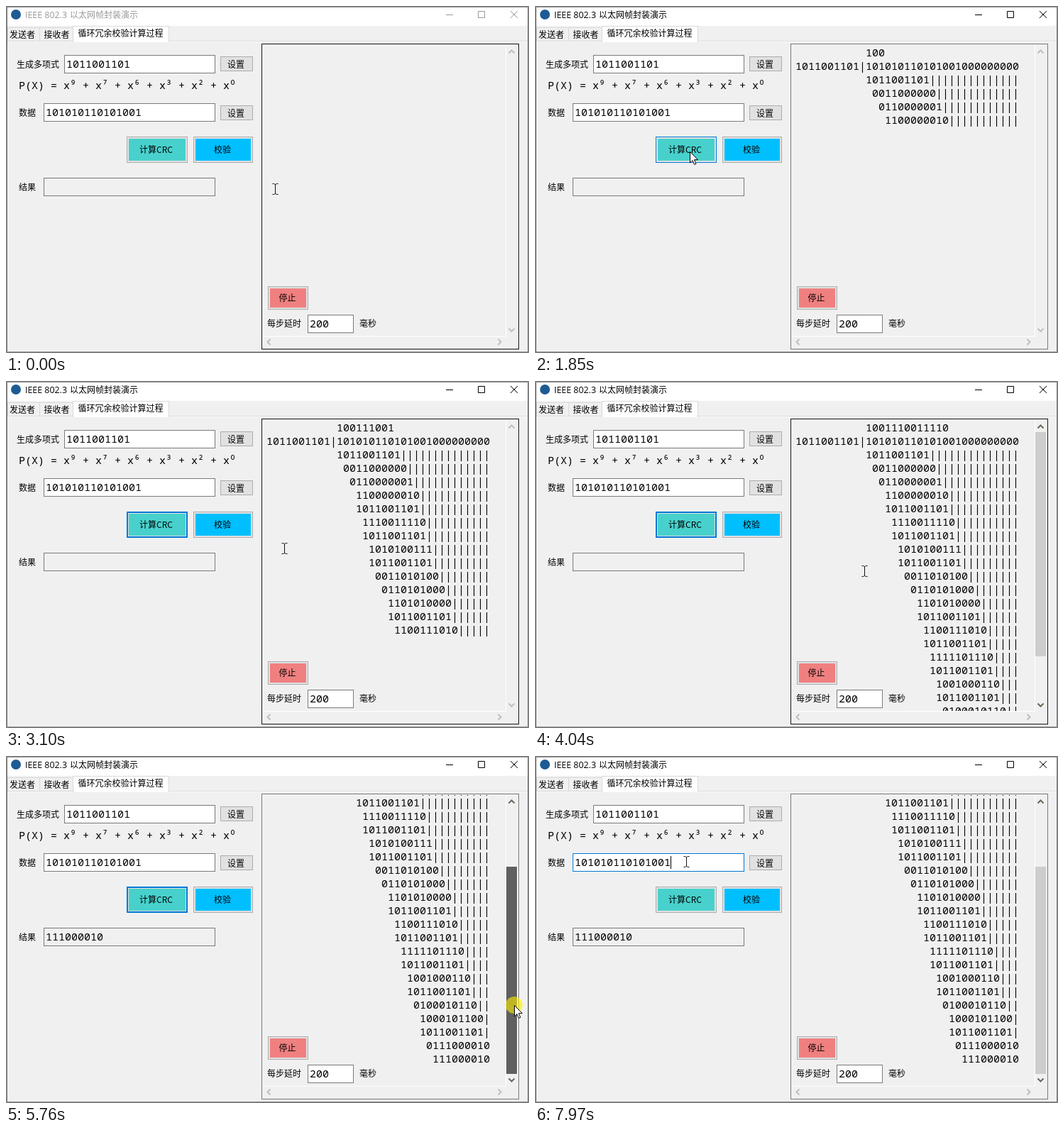
Recreate the animation shown at these times as an HTML page. Size 737 by 489 pixels, loop 8000 ms.

```html
<!DOCTYPE html>
<html lang="zh">
<head>
<meta charset="utf-8">
<title>CRC</title>
<style>
html, body { margin: 0; width: 100%; height: 100%; overflow: hidden; background: #f0f0f0; }
svg { display: block; }
text { font: 12px "Noto Sans CJK SC", "Noto Sans CJK", sans-serif; white-space: pre; }
text.ui { font: 12.4px "Open Sans", sans-serif; }
text.mono { font: 500 15px "Noto Sans Mono", "DejaVu Sans Mono", monospace; }
</style>
</head>
<body>
<svg id="stage" width="737" height="489" viewBox="0 0 737 489">
  <clipPath id="view"><rect x="361" y="55" width="343" height="410"/></clipPath>
  <clipPath id="sel"><rect id="selClip" x="55" y="245" width="83" height="20"/></clipPath>
</svg>
<script>
const LOOP = 8000;
const stage = document.getElementById("stage");

function add(tag, attrs, parent = stage) {
  const el = document.createElementNS("http://www.w3.org/2000/svg", tag);
  set(el, attrs);
  parent.appendChild(el);
  return el;
}
function set(el, attrs) {
  for (const k in attrs) el.setAttribute(k, attrs[k]);
}
const show = (el, on) => el.setAttribute("visibility", on ? "visible" : "hidden");
const fillBox = (x, y, w, h, fill, parent) =>
  add("rect", { x, y, width: w, height: h, fill }, parent);
// Bordered box given by its outer pixel edges.
const box = (l, t, r, b, fill, stroke) =>
  add("rect", { x: l + .5, y: t + .5, width: r - l - 1, height: b - t - 1, fill, stroke });
const path = (d, stroke) => add("path", { d, fill: "none", stroke });
function label(x, y, str, cls = "", parent) {
  const el = add("text", { x, y, class: cls }, parent);
  el.textContent = str;
  return el;
}
const mono = (x, y, str, parent) => label(x, y, str, "mono", parent);

// ---- long division: each row knows its offset and the step that writes it ----
const POLY = "1011001101", DATA = "101010110101001";
const bits = DATA + "0".repeat(9);
const xor = (a, b) => [...a].map((c, i) => c ^ b[i]).join("");
const rows = [];
let quotient = "", rest = bits.slice(0, 10);
for (let n = 0; n < DATA.length; n++) {
  if (n) rows.push({ n, str: rest, step: n });
  quotient += rest[0];
  if (rest[0] === "1") {
    rows.push({ n, str: POLY, step: n + 1 });
    rest = xor(rest, POLY);
  }
  rest = rest.slice(1) + (bits[n + 10] || "");
}
rows.push({ n: DATA.length, str: rest, step: DATA.length });

// ---- window ----
fillBox(0, 0, 737, 489, "#f0f0f0");
fillBox(0, 0, 737, 28, "#fff");
add("circle", { cx: 14, cy: 12, r: 7, fill: "#1d5b94" });
const title = add("g", {});
label(27, 17, "IEEE 802.3", "ui", title);
label(90, 17, "以太网帧封装演示", "", title);
const controls = path("M620 12.5h10M665.5 7.5h9v9h-9zM711 7l10 10M721 7l-10 10", "#000");

fillBox(2, 49, 733, 1, "#dcdcdc");
fillBox(2, 50, 733, 1, "#fafafa");
box(2, 30, 48, 50, "#f0f0f0", "#d9d9d9");
box(47, 30, 95, 50, "#f0f0f0", "#d9d9d9");
box(94, 28, 230, 51, "#fff", "#d9d9d9");
fillBox(95, 49, 134, 2, "#fff");
label(5, 45, "发送者");
label(53.5, 45, "接收者");
label(101.5, 43, "循环冗余校验计算过程");

// ---- left form ----
const GREY = "#7a7a7a", BLUE = "#0078d7";
label(15, 87, "生成多项式");
box(82, 69, 295, 95, "#fff", GREY);
mono(85, 87, POLY);
mono(18, 117, "P(X) = x⁹ + x⁷ + x⁶ + x³ + x² + x⁰");
label(18, 155, "数据");
const dataBox = box(53, 137, 295, 163, "#fff", GREY);
mono(56, 155, DATA);
const caret = fillBox(191, 141, 1, 18, "#000");
for (const y of [71, 140]) {
  box(302, y, 348, y + 21, "#e1e1e1", "#adadad");
  label(312, y + 16, "设置");
}

function button(l, t, r, b, fill, x, str) {
  const frame = box(l, t, r, b, "#e1e1e1", "#adadad");
  fillBox(l + 3, t + 3, r - l - 6, b - t - 6, fill);
  label(x, (t + b) / 2 + 4.5, str);
  return frame;
}
const calc = button(170, 184, 256, 221, "#48d1cc", 188, "计算CRC");
const calcRing = box(171, 185, 255, 220, "none", BLUE);
button(264, 184, 348, 221, "#00bfff", 293, "校验");

label(18, 260, "结果");
const resultBox = box(53, 242, 295, 268, "#f0f0f0", GREY);
const result = mono(56, 260, rest);
const selClip = document.getElementById("selClip");
const marked = add("g", {});
const inner = add("g", { "clip-path": "url(#sel)" }, marked);
fillBox(55, 245, 83, 20, BLUE, inner);
set(mono(56, 260, rest, inner), { fill: "#fff" });
const selCaret = fillBox(55, 246, 1, 18, "#ff8728", marked);

// ---- right panel ----
const panel = box(360, 53, 723, 484, "#f0f0f0", GREY);
fillBox(704, 55, 1, 411, "#fff");
fillBox(361, 465, 344, 1, "#fff");
const LINE = 19, TRACK = 376, PAGE = 21;
const view = add("g", { "clip-path": "url(#view)" });
const sheet = add("g", {}, view);
const head = add("g", {}, sheet);
const quotientText = mono(466, 71, "", head);
mono(367, 71 + LINE, POLY + "|" + bits, head);
rows.forEach((row, i) => {
  const bars = "|".repeat(Math.max(0, 14 - row.n));
  row.el = mono(466 + 9 * row.n, 71 + LINE * (i + 2), row.str + bars, sheet);
});

const thumb = fillBox(705, 72, 15, TRACK, "#cdcdcd");
const arrows = path("M708.5 66.5l4-4l4 4M708.5 454.5l4 4l4-4", "#bfbfbf");
const sideArrows = path("M372.5 469.5l-4 4l4 4M693.5 469.5l4 4l-4 4", "#bfbfbf");
for (const el of [arrows, sideArrows]) set(el, { "stroke-width": 2 });

button(369, 395, 426, 428, "#f08080", 384.5, "停止");
label(368, 452, "每步延时");
box(425, 435, 490, 461, "#fff", GREY);
mono(428, 453, "200");
label(498, 452, "毫秒");

// ---- pointer ----
const halo = add("circle", { r: 12, fill: "#fff000", "fill-opacity": .6 });
const arrow = add("path", {
  d: "M.5 .5V16L4 12.6L6.6 18.4L9 17.4L6.4 11.7H11.5Z", fill: "#fff", stroke: "#000"
});
const beam = path("M-3.5 -7.5H-1.5L.5 -6.5L2.5 -7.5H4.5M.5 -6.5V6.5M-3.5 7.5H-1.5L.5 6.5L2.5 7.5H4.5", "#111");
add("rect", { x: 1, y: 1, width: 735, height: 487, fill: "none", stroke: "#808080", "stroke-width": 2 });

// ---- timing, counted in screen refreshes ----
const STEP = 156;
// Bursts of refreshes: start in ms, number of steps.
const BURSTS = [[440, 5], [1380, 4], [2160, 7], [3410, 7], [4510, 6], [5590, 7], [6690, 7], [7800, 2]];
const CLICK = 6, DONE = 24, GRAB = 28, DROP = 31, MARK = 37, MARKED = 39, TYPE = 42;
// Pointer moves: first step, last step, x, y.
const HOME = [379, 258];
const MOVES = [[0, 5, 218, 205], [9, 16, 392, 236], [17, 21, 464, 268], [21, 27, 714, 267],
  [GRAB, DROP, 716, 351], [DROP, 36, 197, 258], [36, MARKED, 9, 250], [40, TYPE, 200, 147],
  [43, 45, 213, 149]];

const clamp = (v, lo, hi) => Math.max(lo, Math.min(hi, v));
const between = (v, a, b) => v >= a && v <= b;
const inBox = (x, y, l, t, r, b) => between(x, l, r - 1) && between(y, t, b - 1);

const refreshAt = t => BURSTS.reduce(
  (sum, [from, n]) => sum + clamp(Math.floor((t - from) / STEP) + 1, 0, n), 0);

function pointerAt(k) {
  let [x, y] = HOME;
  for (const [a, b, toX, toY] of MOVES) {
    const p = clamp((k - a) / (b - a), 0, 1);
    x += (toX - x) * p;
    y += (toY - y) * p;
  }
  return [Math.round(x), Math.round(y)];
}

function drawPointer(k, x, y, isBeam) {
  for (const el of [halo, arrow, beam]) set(el, { transform: `translate(${x} ${y})` });
  show(halo, k === CLICK || k === TYPE || between(k, GRAB, DROP) || between(k, MARK, MARKED));
  show(beam, isBeam);
  show(arrow, !isBeam);
}

function drawDivision(k, x) {
  const digits = clamp(Math.floor((k - 5.5) * .86), 0, quotient.length);
  quotientText.textContent = quotient.slice(0, digits);
  show(head, digits > 0);
  for (const row of rows) show(row.el, row.step <= digits);

  const written = rows.filter(row => row.step <= digits).length;
  const lines = Math.min(written + 4, rows.length + 3);
  const drag = k < GRAB ? 0 : pointerAt(Math.min(k, DROP))[1] - pointerAt(GRAB)[1];
  const scroll = Math.round(drag * lines / TRACK);
  set(sheet, { transform: `translate(0 ${-LINE * scroll})` });

  const scrollable = lines > PAGE;
  show(thumb, scrollable);
  set(thumb, {
    y: 72 + drag,
    height: Math.round(TRACK * PAGE / lines),
    fill: between(k, GRAB, DROP) ? "#606060" : x > 704 ? "#a6a6a6" : "#cdcdcd"
  });
  set(arrows, { stroke: scrollable ? "#706558" : "#bfbfbf" });
}

function drawForm(k, x, y) {
  const hover = inBox(x, y, 170, 184, 256, 221);
  const focused = between(k, CLICK, MARK - 1);
  set(calc, { stroke: hover || focused ? BLUE : "#adadad" });
  show(calcRing, focused && !hover);

  show(result, k >= DONE);
  const chosen = between(k, MARK, TYPE - 1);
  const left = k < MARKED ? 55 + 9 * clamp(Math.round((x - 56) / 9), 0, 9) : 55;
  set(resultBox, { stroke: chosen ? BLUE : GREY });
  show(marked, chosen);
  set(selClip, { x: left, width: Math.max(0, 138 - left) });
  set(selCaret, { x: left });

  set(dataBox, { stroke: k >= TYPE ? BLUE : GREY });
  show(caret, k >= TYPE);
}

function draw(t) {
  const k = refreshAt(t);
  const [x, y] = pointerAt(k);
  const overPanel = inBox(x, y, 361, 54, 704, 465);
  const overField = inBox(x, y, 53, 137, 295, 163) || inBox(x, y, 53, 242, 295, 268);
  const ink = k >= CLICK ? "#000" : "#999";

  set(title, { fill: ink });
  set(controls, { stroke: ink });
  set(panel, { stroke: overPanel ? "#171717" : GREY });
  drawForm(k, x, y);
  drawDivision(k, x);
  drawPointer(k, x, y, overPanel || overField || between(k, MARK, MARKED + 1));
}

let start = null;
function frame(now) {
  if (start === null) start = now;
  draw((now - start) % LOOP);
  requestAnimationFrame(frame);
}
draw(0);
requestAnimationFrame(frame);
</script>
</body>
</html>
```
